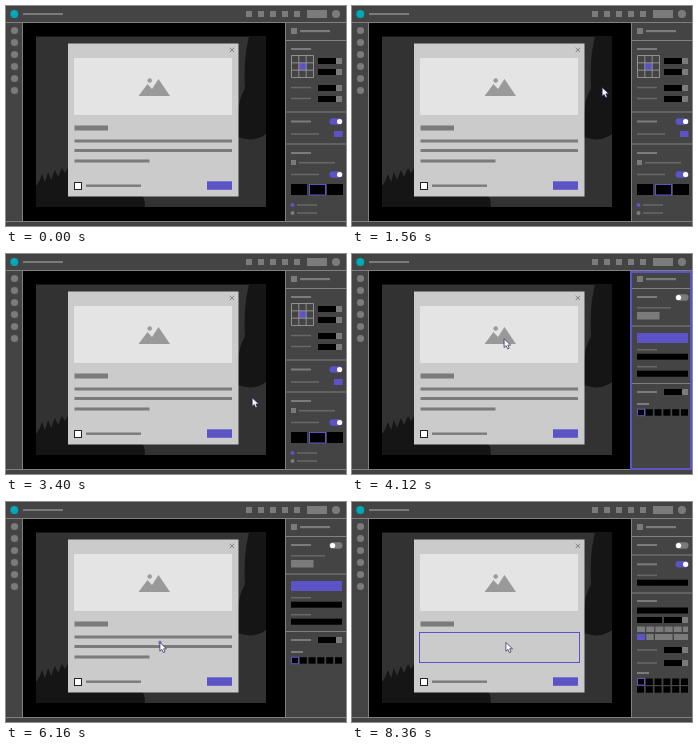
An HTML page for the animation above (8.4 s loop, 340 px wide and 220 px high).

```html
<!DOCTYPE html>
<html lang="en">
<head>
<meta charset="utf-8">
<title>Popup editor</title>
<style>
html, body { margin: 0; width: 100%; height: 100%; overflow: hidden; background: #444; }
svg { display: block; width: 340px; height: 220px; }
</style>
</head>
<body>
<svg id="stage" viewBox="0 0 340 220" xmlns="http://www.w3.org/2000/svg"></svg>
<script>
const LOOP = 8400, FRAME = 40;
const ACCENT = '#5c54c6', GREY = '#7b7b7b', DIM = '#686868', BAR = '#444', LINE = '#808080';

const rect = (x, y, w, h, fill, extra = '') =>
  `<rect x="${x}" y="${y}" width="${w}" height="${h}" fill="${fill}" ${extra}/>`;
const disc = (x, y, r, fill) => `<circle cx="${x}" cy="${y}" r="${r}" fill="${fill}"/>`;
const path = (d, fill, extra = '') => `<path d="${d}" fill="${fill}" ${extra}/>`;
const group = (id, body) => `<g id="${id}">${body}</g>`;
const repeat = (n, make) => Array.from({ length: n }, (_, i) => make(i)).join('');

// Settings panel parts
const label = (y, w = 20) => rect(285, y - 1, w, 2, GREY);
const thin = (y, w = 20, x = 285) => rect(x, y - 0.75, w, 1.5, DIM);
const divider = y => rect(280, y - 0.5, 60, 1, LINE);
const wide = y => rect(285, y, 51, 6, '#000');
const field = y => rect(312, y, 18, 6, '#000') + rect(330, y, 6, 6, GREY);
const toggle = (y, on) => rect(323.5, y - 3.2, 13, 6.4, on ? ACCENT : GREY, 'rx="3.2"') +
  disc(on ? 333.6 : 326.6, y, 2.6, '#fff');
const swatches = (y, chosen) => repeat(6, i => rect(285 + i * 8.8, y, 7, 6.5, '#000')) +
  (chosen ? rect(285.5, y, 7, 6.5, 'none', `stroke="${ACCENT}"`) : '');
const header = rect(285, 22, 6, 6, GREY) + rect(294, 24, 30, 2.2, GREY) + divider(34.5);

function popupPanel() {
  const grid = repeat(4, i => {
    const d = i * 7.33;
    return `M285.5 ${49.5 + d}h22M${285.5 + d} 49.5v22`;
  });
  return label(43) + rect(293, 57, 7, 7, ACCENT) + path(grid, 'none', 'stroke="#999" stroke-width=".9"') +
    field(52) + field(63) + thin(81.5) + field(79) + thin(92.5) + field(90) + divider(106) +
    label(115.5) + toggle(115.5, true) + thin(128, 28) + rect(328, 125, 8.5, 6, ACCENT) + divider(138) +
    label(147) + rect(285, 154, 5, 5, GREY) + thin(156.7, 36, 293) + thin(168.5, 28) + toggle(168.5, true) +
    repeat(3, i => rect(285 + i * 18, 178, 16, 11, '#000')) +
    rect(303.5, 178.5, 16, 10.5, 'none', `stroke="${ACCENT}"`) +
    disc(286.5, 199, 2, ACCENT) + thin(199, 20, 291) + disc(286.5, 207, 2, GREY) + thin(207, 20, 291);
}

function imagePanel() {
  return label(43) + toggle(43.5, false) + thin(53.8, 34) + rect(285, 58, 22.5, 7.5, GREY) + divider(72) +
    rect(285, 79, 51, 10, ACCENT) + thin(95.7) + wide(99.7) + thin(112.7) + wide(116.7) + divider(129.5) +
    label(138) + field(135) + label(150, 12) + swatches(155.2, true);
}

function textPanel() {
  return label(43) + toggle(43.5, false) + divider(53) + label(62.3) + toggle(62.3, true) +
    thin(73.3) + wide(77.7) + divider(91) + label(99) + wide(105.5) +
    rect(285, 115, 25, 6, '#000') + field(115) +
    repeat(6, i => rect(285 + i * 9.2, 124.5, i < 5 ? 8 : 5, 5.5, GREY)) +
    rect(285, 132, 8, 6, ACCENT) + rect(294.2, 132, 7.5, 6, GREY) +
    rect(303, 132, 17.5, 6, GREY) + rect(322, 132, 14, 6, GREY) +
    thin(148) + field(145) + thin(161) + field(158) + label(171, 12) +
    swatches(176.5, true) + swatches(184.2, false);
}

function frame() {
  return rect(0, 0, 340, 220, BAR) + rect(17, 17, 262, 198, '#000') +
    rect(30, 30.5, 230, 170.5, '#323232') +
    path('M260 30.5H243C239 46 238 65 239 82Q233 92 232 108V131Q248 137 260 128Z', '#151515') +
    path('M30 201V180Q34 175 36 168L39 176 42 166 45 174 49 164 52 171 56 162 59 167 63 160V186H133Q139 190 139 201Z', '#151515') +
    rect(0, 16, 340, 1, LINE) + rect(16, 16, 1, 199, LINE) + rect(279, 16, 1, 199, LINE) +
    rect(0, 215, 340, 1, LINE) +
    disc(8.3, 8, 4, '#00a9b8') + rect(17, 7, 40, 2, GREY) +
    repeat(5, i => rect(240 + i * 12, 5, 6, 6, GREY)) + rect(301, 4, 20, 8, GREY) + disc(330, 8, 4, GREY) +
    repeat(6, i => disc(8.5, 24.5 + i * 12, 3.6, GREY));
}

function popup() {
  return rect(62, 37.5, 170.5, 153, '#cbcbcb') +
    path('M223.7 41.8l4.4 4.4m0-4.4l-4.4 4.4', 'none', 'stroke="#777" stroke-width=".9"') +
    rect(68, 52, 158, 57, '#e4e4e4') +
    path('M132.5 90L141.5 78 146 83 152.5 73 164 90Z', '#999') + disc(143.7, 74.5, 2.2, '#999') +
    rect(68.5, 119.5, 33.5, 5, GREY) +
    group('lines', rect(68.5, 133.5, 157.5, 3, GREY) + rect(68.5, 143, 157.5, 3, GREY) +
      rect(68.5, 153.5, 75, 3, GREY)) +
    group('selection', rect(67.5, 130.5, 160, 30, 'none', `stroke="${ACCENT}"`)) +
    group('caret', rect(69, 131.5, 1.2, 8.5, '#222')) +
    rect(68.5, 176.5, 7, 7, '#fff', 'stroke="#222"') + rect(80, 178.5, 55, 2.4, GREY) +
    rect(201, 175.3, 25, 8.5, ACCENT);
}

const stage = document.getElementById('stage');
stage.innerHTML = frame() + popup() + header +
  group('popupPanel', popupPanel()) + group('imagePanel', imagePanel()) + group('textPanel', textPanel()) +
  group('outline', rect(279, 18, 60, 197, 'none', `stroke="${ACCENT}" stroke-width="2"`)) +
  `<circle id="ring" fill="${ACCENT}" fill-opacity=".35" stroke="${ACCENT}" stroke-width=".8"/>` +
  group('cursor', path('M.4 .5V9.2L2.4 7.4 3.9 10.6 5.5 9.9 4.1 6.8H7Z', '#fff',
    'stroke="#201c55" stroke-width=".7" stroke-linejoin="round"'));

const part = {};
for (const el of stage.querySelectorAll('[id]')) part[el.id] = el;

// Pointer moves: start, end, from x, y, to x, y
const moves = [
  [0, 720, 44, 178, 191, 116],
  [1360, 1760, 191, 116, 308.5, 46],
  [1960, 2360, 308.5, 46, 308.5, 118.5],
  [2560, 2960, 308.5, 118.5, 308.5, 182.5],
  [3160, 3760, 308.5, 182.5, 151.7, 84.3],
  [5160, 5760, 151.7, 84.3, 153.5, 140]
];
const clicks = [720, 3760, 6120], CLICK = 360;
const flashes = [920, 4120, 6520];

const clamp = v => Math.max(0, Math.min(1, v));
const progress = (t, a, b) => clamp((t - a) / (b - a));
const show = (el, on) => el.setAttribute('visibility', on ? 'visible' : 'hidden');

function pointer(t) {
  const [a, b, x0, y0, x1, y1] = moves.filter(m => t >= m[0]).pop();
  const p = progress(t, a, b);
  return [x0 + (x1 - x0) * p, y0 + (y1 - y0) * p];
}

function render(t) {
  const [x, y] = pointer(t);
  part.cursor.setAttribute('transform', `translate(${x} ${y})`);
  show(part.cursor, t >= FRAME);

  const start = clicks.find(c => t > c && t < c + CLICK);
  const pulse = start === undefined ? 0 : 1 - Math.abs((t - start) / CLICK * 2 - 1);
  part.ring.setAttribute('cx', x + 0.4);
  part.ring.setAttribute('cy', y + 0.4);
  part.ring.setAttribute('r', 5.8 * pulse);
  show(part.ring, pulse > 0);

  show(part.popupPanel, t < flashes[1]);
  show(part.imagePanel, t >= flashes[1] && t < flashes[2]);
  show(part.textPanel, t >= flashes[2]);
  show(part.outline, flashes.some(f => (t >= f && t < f + 240) || (t >= f + 440 && t < f + 640)));

  const edit = progress(t, 6480, 6680);
  part.lines.setAttribute('opacity', 1 - edit);
  part.selection.setAttribute('opacity', edit);
  show(part.caret, t >= 6960 && (t - 6960) % 400 < 200);
}

const begin = performance.now();
function tick() {
  const t = (performance.now() - begin) % LOOP;
  render(Math.floor(t / FRAME) * FRAME);
  requestAnimationFrame(tick);
}
render(0);
requestAnimationFrame(tick);
</script>
</body>
</html>
```
